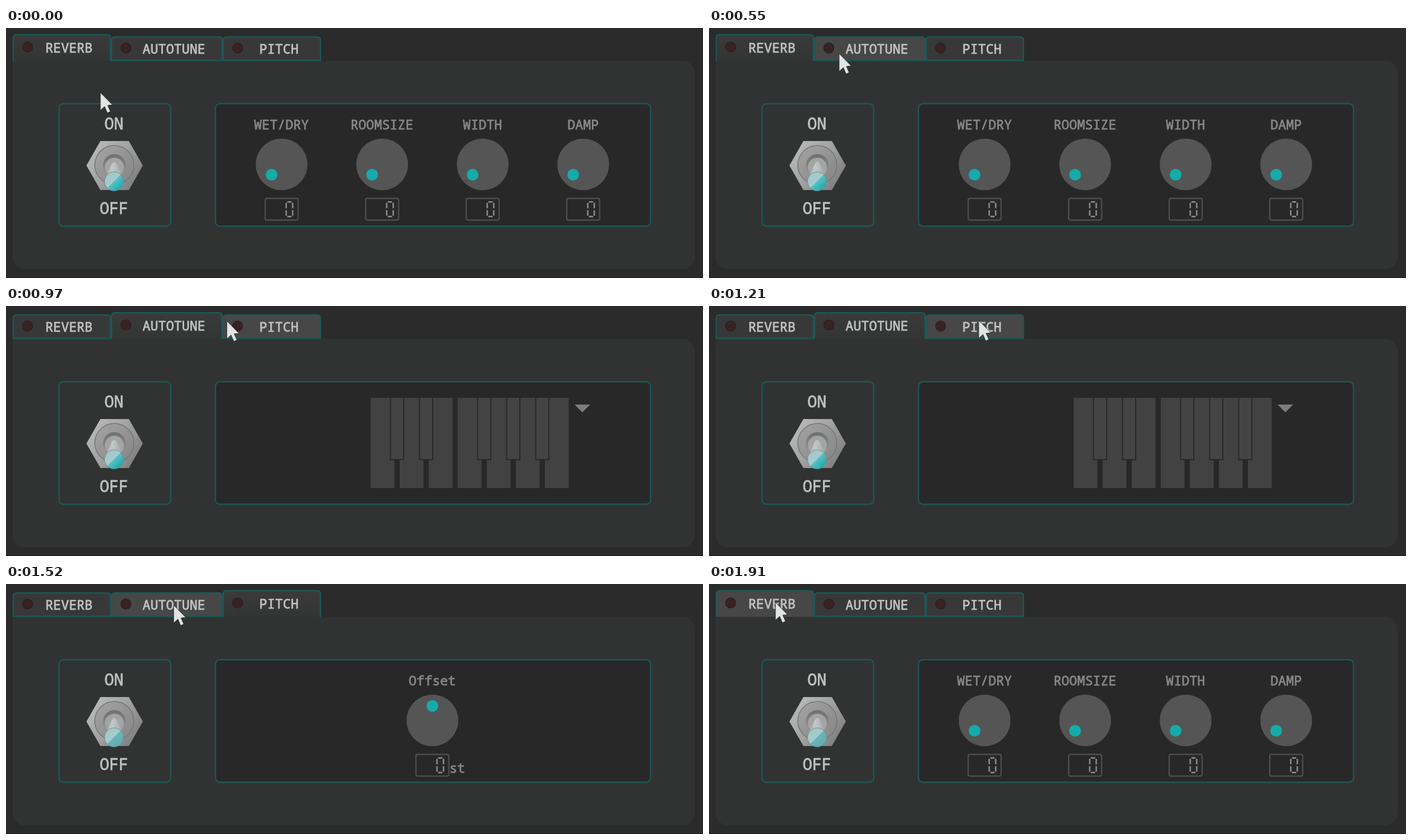
Animation, 1248 px wide and 449 px high, one loop 1940 ms. Source, as an HTML page:

```html
<!DOCTYPE html>
<html lang="en">
<head>
<meta charset="utf-8">
<title>Vocal effects panel</title>
<style>
  html, body { margin: 0; width: 100%; height: 100%; overflow: hidden; background: #2b2b2b; }
  svg { display: block; width: 100%; height: 100%; }
  text {
    font: 500 23.4px "Noto Sans Mono", "DejaVu Sans Mono", monospace;
    text-anchor: middle; fill: #878787; stroke: #878787; stroke-width: 0.8;
  }
  .tab text { fill: #c0c2c1; stroke: #c0c2c1; }
  .switch text { font-size: 28.5px; fill: #bec2c0; stroke: #bec2c0; }
  .frame { stroke: #1d5856; stroke-width: 2.4; }
</style>
</head>
<body>
<svg id="stage" viewBox="0 0 1248 449" xmlns="http://www.w3.org/2000/svg">
  <defs>
    <linearGradient id="active" x1="0" y1="0" x2="0" y2="1">
      <stop offset="0" stop-color="#3a3a3a"/><stop offset="1" stop-color="#333534"/>
    </linearGradient>
    <linearGradient id="nut" x1="0" y1="0.1" x2="1" y2="0.8">
      <stop offset="0" stop-color="#bdbdbd"/><stop offset="0.5" stop-color="#a2a2a2"/><stop offset="1" stop-color="#7b7b7b"/>
    </linearGradient>
    <linearGradient id="ring" x1="0" y1="0" x2="1" y2="1">
      <stop offset="0" stop-color="#a4a4a4"/><stop offset="1" stop-color="#858585"/>
    </linearGradient>
    <linearGradient id="bore" x1="0" y1="0" x2="0" y2="1">
      <stop offset="0" stop-color="#6f6f6f"/><stop offset="1" stop-color="#999"/>
    </linearGradient>
    <linearGradient id="lever">
      <stop offset="0" stop-color="#a9adad"/><stop offset="0.4" stop-color="#c3c8c8"/><stop offset="1" stop-color="#a0a4a4"/>
    </linearGradient>
    <linearGradient id="ball" x1="0.1" y1="0.1" x2="0.9" y2="0.9">
      <stop offset="0" stop-color="#a3c6c8"/><stop offset="0.5" stop-color="#a5ccce"/>
      <stop id="tintA" offset="0.5"/><stop id="tintB" offset="1"/>
    </linearGradient>
  </defs>
  <rect width="1248" height="449" fill="#2b2b2b"/>
  <rect y="448" width="1248" height="1" fill="#1b1b1b"/>
  <path d="M12 59H1215Q1226 60 1233 77V415Q1229 428 1217 433H29Q17 430 12 416Z" fill="#313332"/>
  <g id="tabs"></g>
  <g class="switch">
    <rect class="frame" x="95" y="136" width="200" height="220" rx="8" fill="none"/>
    <text x="193.3" y="181.7">ON</text>
    <text x="193.3" y="333.7">OFF</text>
    <path d="M144 247L169 203H220L245 247L220 291H169Z" fill="url(#nut)"/>
    <circle cx="194" cy="246" r="35" fill="url(#ring)" stroke="#747474" stroke-width="1.5"/>
    <circle cx="194" cy="247" r="20.5" fill="url(#bore)"/>
    <circle cx="194" cy="250" r="17" fill="#a3a4a4"/>
    <path d="M177 273L188 247Q194 234 200 247L210 273Z" fill="url(#lever)"/>
    <circle cx="193.5" cy="275.5" r="17" fill="url(#ball)" stroke="#6e8f90" stroke-width="1"/>
  </g>
  <rect class="frame" x="375" y="136" width="779" height="220" rx="8" fill="#282828"/>
  <g id="pages"></g>
  <path id="cursor" d="M0 0V32L7.5 25L12.5 36.5L18 34L13 23L21.5 22Z" fill="#e2e4e4" stroke="#262727" stroke-width="0.8"/>
</svg>
<script>
const LOOP = 1940;
const $ = id => document.getElementById(id);

const tabs = [
  { name: 'REVERB', x: 12, w: 176, label: 112.7 },
  { name: 'AUTOTUNE', x: 188, w: 200, label: 300.7 },
  { name: 'PITCH', x: 388, w: 176, label: 488.7 }
];

// Cursor stops: time, x, y
const stops = [
  [0, 169, 116], [50, 169, 116], [550, 233, 46], [690, 233, 46], [970, 395, 27],
  [1210, 483, 26], [1240, 483, 26], [1520, 301, 38], [1760, 119, 33], [LOOP, 119, 33]
];

const label = (x, y, text) => `<text x="${x}" y="${y}">${text}</text>`;

function digitBox(cx) {
  const l = cx + 8.2, r = cx + 19.8, segs =
    `M${l + 2} 312.3H${r - 2}M${l + 2} 338.7H${r - 2}` +
    [l, r].map(x => `M${x} 314V323.8M${x} 327.2V337`).join('');
  return `<rect x="${cx - 29.5}" y="306" width="59" height="39" rx="3" fill="none" stroke="#4e4e4e" stroke-width="2.4"/>
    <path d="${segs}" stroke="#888" stroke-width="2.7" fill="none"/>`;
}

function knob(cx, name, dx, dy) {
  return label(cx - 0.3, 181.7, name) +
    `<circle cx="${cx}" cy="245" r="46.3" fill="#555"/>
    <circle cx="${cx + dx}" cy="${245 + dy}" r="10.5" fill="#15abac"/>` + digitBox(cx);
}

function keyboard() {
  let keys = '';
  for (let i = 0; i < 7; i++)
    keys += `<rect x="${653 + 52 * i}" y="165" width="42.5" height="162" fill="#424242"/>`;
  for (const i of [0, 1, 3, 4, 5])
    keys += `<path d="M${688.5 + 52 * i} 165V276H${712 + 52 * i}V165" fill="#444" stroke="#282828" stroke-width="2"/>`;
  return keys + '<path d="M1018 177H1046L1032 191Z" fill="#7c7c7c"/>';
}

$('pages').innerHTML = [
  ['WET/DRY', 'ROOMSIZE', 'WIDTH', 'DAMP'].map((n, i) => knob(493.5 + 180 * i, n, -18, 18.5)).join(''),
  keyboard(),
  knob(763.5, 'Offset', 0, -26) + label(808, 339, 'st')
].map(page => `<g>${page}</g>`).join('');
const pages = [...$('pages').children];

$('tabs').innerHTML = tabs.map(t => `<g class="tab"><path class="frame"/><g>
  <circle cx="${t.x + 26.7}" cy="36" r="9" fill="#392222" stroke="#2d2020" stroke-width="1.5"/>
  ${label(t.label, 45.6, t.name)}</g></g>`).join('');
const tabNodes = [...$('tabs').children];

// Slope at a stop; zero where the cursor rests
function slope(i, axis) {
  const a = stops[i - 1], b = stops[i], c = stops[i + 1];
  if (!a || !c) return 0;
  const still = (p, q) => p[1] === q[1] && p[2] === q[2];
  return still(a, b) || still(b, c) ? 0 : (c[axis] - a[axis]) / (c[0] - a[0]);
}

function cursorAt(t) {
  let i = 0;
  while (i < stops.length - 2 && t >= stops[i + 1][0]) i++;
  const a = stops[i], b = stops[i + 1], span = b[0] - a[0], u = (t - a[0]) / span;
  const ease = u * u * (3 - 2 * u);
  return [1, 2].map(k => a[k] + (b[k] - a[k]) * ease +
    span * u * (1 - u) * ((1 - u) * slope(i, k) - u * slope(i + 1, k)));
}

function draw(t) {
  const [x, y] = cursorAt(t);
  const active = t < 690 ? 0 : t < 1240 ? 1 : t < 1910 ? 2 : 0;
  tabs.forEach((tab, i) => {
    const on = i === active, top = on ? 12 : 16;
    const hover = y < 59 && x >= tab.x && x < tab.x + tab.w;
    const l = tab.x + 1, r = tab.x + tab.w - 1, bottom = on ? 59 : 58;
    const [shape, content] = tabNodes[i].children;
    shape.setAttribute('d', `M${l} ${bottom}V${top + 6}Q${l} ${top} ${l + 6} ${top}H${r - 6}Q${r} ${top} ${r} ${top + 6}V${bottom}${on ? '' : 'Z'}`);
    shape.setAttribute('fill', hover ? '#474747' : on ? 'url(#active)' : '#383838');
    content.setAttribute('transform', `translate(0 ${on ? -2 : 0})`);
  });
  pages.forEach((p, i) => p.setAttribute('display', i === active ? 'inline' : 'none'));
  const pale = t >= 1240;
  $('tintA').setAttribute('stop-color', pale ? '#6bb3b7' : '#5bbfc4');
  $('tintB').setAttribute('stop-color', pale ? '#5aaeb3' : '#16a9ae');
  $('cursor').setAttribute('transform', `translate(${x.toFixed(2)} ${y.toFixed(2)})`);
}

const start = performance.now();
function tick() {
  draw((performance.now() - start) % LOOP);
  requestAnimationFrame(tick);
}
tick();
</script>
</body>
</html>
```
